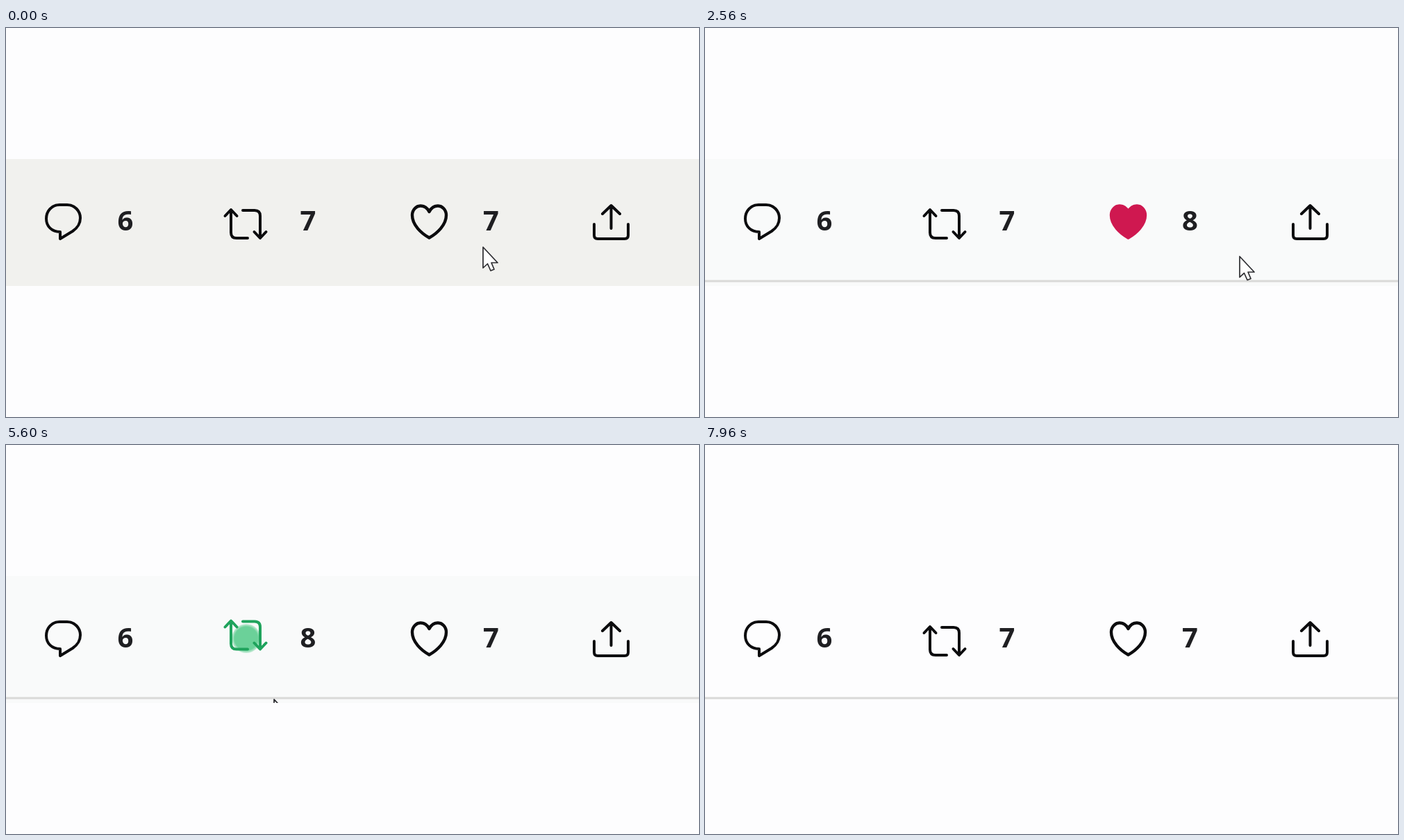
Write an HTML page that moves like this. It is 998 px wide and 561 px high and loops after 8 s.

```html
<!DOCTYPE html>
<html lang="en">
<head>
<meta charset="utf-8">
<title>Post actions</title>
<style>
  html, body { margin: 0; width: 100%; height: 100%; overflow: hidden; background: #fdfdfe; }
  svg { display: block; width: 100vw; height: 100vh; }
  text { font: 700 40px "Open Sans", "Noto Sans", sans-serif; text-anchor: middle; fill: #1f1f22; }
  .icon { fill: none; stroke: #0c0c0e; stroke-width: 4; stroke-linecap: round; stroke-linejoin: round; }
  .cursor { fill: #fff; stroke: #2c2c30; stroke-width: 1.7; stroke-linejoin: round; }
  #heart { stroke-width: 4.4; }
</style>
</head>
<body>
<svg viewBox="0 0 998 561">
  <defs>
    <clipPath id="bandClip"><rect y="189" width="998" height="183"/></clipPath>
    <clipPath id="countClip"><rect y="256" width="998" height="43"/></clipPath>
    <radialGradient id="glowFill">
      <stop offset=".4" stop-color="#f49be4"/>
      <stop offset=".75" stop-color="#f8bdee"/>
      <stop offset="1" stop-color="#fae0f5"/>
    </radialGradient>
    <radialGradient id="pulseFill">
      <stop offset=".8" stop-color="#6bd199"/>
      <stop offset="1" stop-color="#6bd199" stop-opacity=".3"/>
    </radialGradient>
  </defs>
  <rect width="998" height="561" fill="#fdfdfe"/>
  <g clip-path="url(#bandClip)">
    <rect id="band" y="189" width="998" height="183"/>
    <rect id="rule" y="363.5" width="998" height="3" fill="#d9d9d8"/>

    <path class="icon" d="M77 255H88C99 255 107 264 107 274C107 283 103 288 96 293L78 304V294C66 294 58 286 58 275C58 264 66 255 77 255Z"/>
    <text x="172" y="292">6</text>

    <circle id="repostHover" cx="345" cy="280" r="53" fill="#d3ecdf"/>
    <circle id="pulse" cx="346" cy="279" fill="url(#pulseFill)"/>
    <path id="repost" class="icon" d="M315.500 271L324 262L332.500 271M324 263V295Q324 303 332 303H348M341 263H358Q366 263 366 271V302M357.500 294L366 303L374.500 294"/>

    <circle id="likeHover" cx="609.5" cy="280" r="53" fill="#f3d9e2"/>
    <circle id="glow" cx="609.5" cy="280" r="52" fill="url(#glowFill)"/>
    <circle id="bloom" cx="609.5" cy="280" fill="#d56bbd"/>
    <g id="dots" transform="translate(609.5 280)"></g>
    <path id="heart" class="icon" d="M609.500 302.500C598 296 585 284 585 270C585 262 591 256.500 597 256.500C603 256.500 607 260 609.500 265C612 260 616 256.500 622 256.500C628 256.500 634 262 634 270C634 284 621 296 609.500 302.500Z"/>

    <path class="icon" d="M859 268L871.500 256L884 268M871.500 257V289M847 283V299Q847 304 852 304H891Q896 304 896 299V283"/>

    <g clip-path="url(#countClip)">
      <text id="repost7" x="435" y="292">7</text>
      <text id="repost8" x="435" y="292">8</text>
      <text id="like7" x="698.5" y="292">7</text>
      <text id="like8" x="698.5" y="292">8</text>
    </g>

    <path id="arrow" class="cursor" d="M1 1V31L7.500 25L12 35L17 33L13 23.500H22Z"/>
    <g id="hand" class="cursor">
      <path d="M-4 3Q-4 -1 0 -1Q4 -1 4 3V14Q5 11 9 13Q10 14 10 16Q12 14 15 16Q16 17 16 19Q20 18 21 22V31Q21 36 18 40Q16 45 8 45Q0 45 -2 40Q-3 38 -6 35L-12 27Q-14 21 -8 23L-4 27Z"/>
      <path fill="none" d="M4 14V23M10 16V24M16 19V25"/>
    </g>
  </g>
</svg>
<script>
const LOOP = 8000, STEP = 40;
const LIKE = 880, UNLIKE = 3320, REPOST = 5260, UNDO = 7120;
const BLACK = [12, 12, 14], RED = [207, 24, 80], GREEN = [31, 163, 92];
const WARM = [241, 241, 238], PALE = [249, 250, 250], WHITE = [253, 253, 254];

const $ = id => document.getElementById(id);
const set = (id, attrs) => { for (const k in attrs) $(id).setAttribute(k, attrs[k]); };
const clamp = x => Math.min(1, Math.max(0, x));
const part = (t, from, to) => clamp((t - from) / (to - from));
const ease = x => x * x * (3 - 2 * x);
const lerp = (a, b, p) => a + (b - a) * p;
const mix = (a, b, p) => a.map((v, i) => lerp(v, b[i], p));
const rgb = c => `rgb(${c.map(Math.round)})`;
// Rises to 1 at a, falls back to 0 at b
const hold = (t, a, b, len) => ease(part(t, a, a + len)) - ease(part(t, b, b + len));

const heart = { x: 610, y: 297 }, repost = { x: 348, y: 290 };
const below = { x: 390, y: 376 };
const stops = [
  { x: 686, y: 315, from: 0, to: 80 },
  { ...heart, from: 360, to: 1040 },
  { x: 1014, y: 326, from: 1320, to: 1320 },
  { x: 1014, y: 377, from: 2400, to: 2400 },
  { ...heart, from: 2680, to: 4080 },
  { ...repost, from: 4360, to: 5380 },
  { ...below, from: 5660, to: 6440 },
  { ...repost, from: 6720, to: 7400 },
  { ...below, from: 7680, to: LOOP }
];

function cursorAt(t) {
  const i = stops.findLastIndex(s => s.from <= t);
  const a = stops[i], b = stops[i + 1] || a;
  const p = ease(part(t, a.to, b.from));
  return { x: lerp(a.x, b.x, p), y: lerp(a.y, b.y, p) };
}

const hoverOf = (t, spot) => stops
  .filter(s => s.x === spot.x)
  .reduce((sum, s) => sum + hold(t, s.from - 120, s.to + 40, 140), 0);

// Three early sparks, then a ring of small ones
const sparks = [
  { deg: -81, reach: 43, size: 10.5, color: "#7f96cc", start: 1200 },
  { deg: -48, reach: 40, size: 9.5, color: "#d9622c", start: 1200 },
  { deg: -52, reach: 60, size: 4.2, color: "#7fa6cc", start: 1200 }
];
for (let i = 0; i < 10; i++) {
  sparks.push({ deg: i * 36, reach: 46 + i % 2 * 10, size: 5 - i % 2 * 2, color: `hsl(${i * 100} 60% 75%)`, start: 1320 });
}
for (const s of sparks) {
  s.dot = document.createElementNS("http://www.w3.org/2000/svg", "circle");
  s.dot.setAttribute("fill", s.color);
  $("dots").append(s.dot);
}

function drawSparks(t) {
  for (const s of sparks) {
    const p = part(t, s.start, s.start + 400);
    const d = s.reach * (0.9 + 0.5 * p), a = s.deg * Math.PI / 180;
    s.dot.setAttribute("cx", d * Math.cos(a));
    s.dot.setAttribute("cy", d * Math.sin(a));
    s.dot.setAttribute("r", p > 0 ? s.size * (1 - p * p) : 0);
  }
}

// Rolls a counter between 7 and 8
function drawCount(name, t, up, down) {
  const p = hold(t, up, down, 240);
  set(name + 7, { y: 292 - 44 * p, opacity: 1 - p });
  set(name + 8, { y: 336 - 44 * p, opacity: p });
}

// Springs from 0 past 1 and settles
function spring(t) {
  const s = Math.max(0, t) / 1000;
  return 1 - Math.exp(-6.2 * s) * Math.cos(5 * Math.PI * s);
}

function drawLike(t) {
  const hover = hoverOf(t, heart);
  const liked = t >= LIKE && t < UNLIKE;
  const color = rgb(liked ? RED : mix(BLACK, RED, hover));
  const scale = liked ? spring(t - LIKE - 200) : 1;
  const open = ease(part(t, LIKE, LIKE + 240));
  set("likeHover", { opacity: hover });
  set("glow", { opacity: hold(t, LIKE + 200, LIKE + 400, 120) });
  set("bloom", { r: 40 * open, opacity: liked ? 1 - part(t, LIKE + 200, LIKE + 360) : 0 });
  set("heart", {
    style: `stroke:${color};fill:${liked ? color : "none"}`,
    transform: `translate(609.5 280) scale(${scale}) translate(-609.5 -280)`
  });
  drawSparks(t);
  drawCount("like", t, LIKE, UNLIKE);
}

function drawRepost(t) {
  const hover = hoverOf(t, repost);
  const on = t >= REPOST && t < UNDO;
  const hop = part(t, REPOST + 180, REPOST + 500), bump = Math.sin(Math.PI * hop);
  set("repostHover", { opacity: hover });
  set("pulse", { r: 42 * hop, opacity: bump });
  set("repost", {
    style: `stroke:${rgb(on ? GREEN : mix(BLACK, GREEN, hover))}`,
    transform: `translate(0 ${-8.5 * bump})`
  });
  drawCount("repost", t, REPOST, UNDO);
}

function drawCursor(t) {
  const { x, y } = cursorAt(t);
  const over = [609.5, 345].some(cx => Math.hypot(x - cx, y - 280) < 53);
  const transform = `translate(${x} ${y})`;
  set("hand", { transform, opacity: over ? 1 : 0 });
  set("arrow", { transform, opacity: over ? 0 : 1 });
}

function draw(t) {
  const tint = mix(mix(WARM, PALE, part(t, 80, 880)), WHITE, part(t, 5700, 6200));
  set("band", { fill: rgb(tint) });
  set("rule", { opacity: part(t, 40, 360) });
  drawLike(t);
  drawRepost(t);
  drawCursor(t);
}

const start = performance.now();
function tick() {
  const t = (performance.now() - start) % LOOP;
  draw(Math.floor(t / STEP) * STEP);
  requestAnimationFrame(tick);
}
tick();
</script>
</body>
</html>
```
